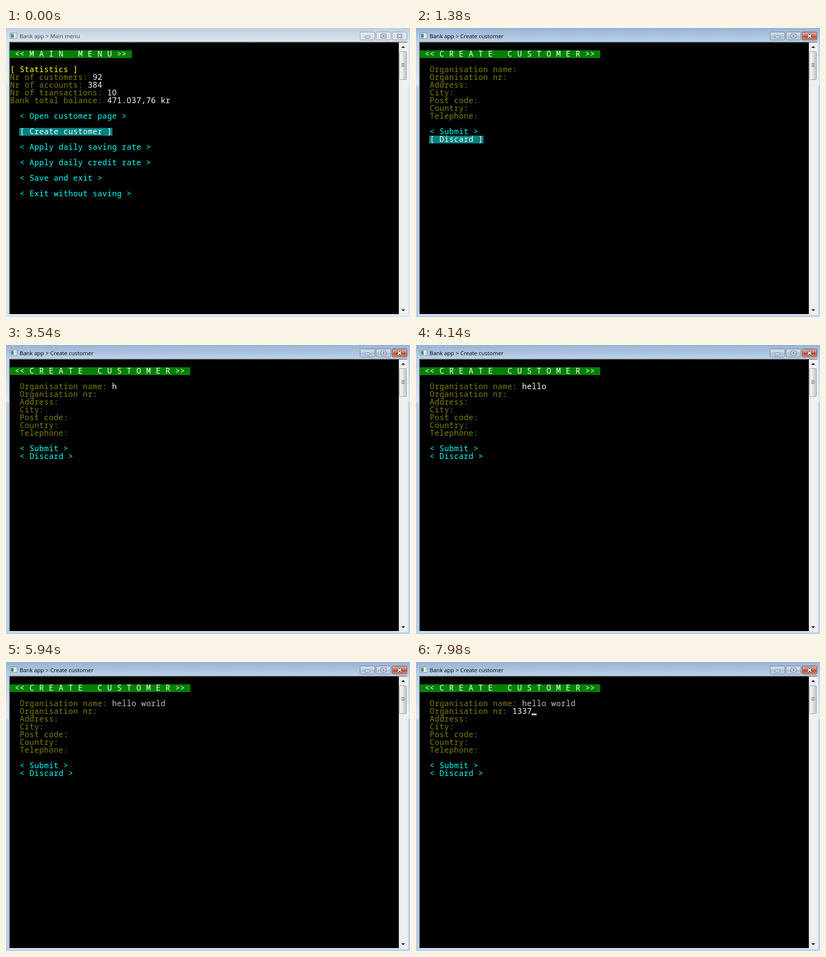
An HTML page that plays this animation: 831x596 px, repeating every 8 s.

```html
<!DOCTYPE html>
<html lang="en">
<head>
<meta charset="utf-8">
<title>Bank app</title>
<style>
  html, body { margin: 0; width: 100%; height: 100%; overflow: hidden; }
  svg { display: block; }
  .cells text { font: 16px "Noto Sans Mono", "DejaVu Sans Mono", monospace; white-space: pre; }
  .cells .plain { font-family: "Noto Sans", sans-serif; }
  #title { font: 11.5px "Open Sans", "Noto Sans", sans-serif; }
</style>
</head>
<body>
<svg id="stage" width="831" height="596" viewBox="0 0 831 596">
  <defs>
    <linearGradient id="barOff" x2="0" y2="1">
      <stop stop-color="#bfcddd"/><stop offset="1" stop-color="#d9e5f2"/>
    </linearGradient>
    <linearGradient id="barOn" x2="0" y2="1">
      <stop stop-color="#98b3d1"/><stop offset="1" stop-color="#bad1ea"/>
    </linearGradient>
    <linearGradient id="sideOn" x2="0" y2="1">
      <stop stop-color="#bad1ea"/><stop offset="1" stop-color="#dce8f5"/>
    </linearGradient>
    <linearGradient id="sideOff" x2="0" y2="1">
      <stop stop-color="#d9e5f2"/><stop offset="1" stop-color="#e6eef7"/>
    </linearGradient>
    <linearGradient id="btnOff" x2="0" y2="1">
      <stop stop-color="#e0e9f4"/><stop offset="1" stop-color="#d3e0ee"/>
    </linearGradient>
    <linearGradient id="btnOn" x2="0" y2="1">
      <stop stop-color="#cfdeee"/><stop offset=".48" stop-color="#bdd0e6"/>
      <stop offset=".5" stop-color="#a5bdd8"/><stop offset="1" stop-color="#bcd2ea"/>
    </linearGradient>
    <linearGradient id="btnRed" x2="0" y2="1">
      <stop stop-color="#e3a496"/><stop offset=".48" stop-color="#d27a66"/>
      <stop offset=".5" stop-color="#bd4630"/><stop offset="1" stop-color="#d98063"/>
    </linearGradient>
    <linearGradient id="track">
      <stop stop-color="#e5e5e5"/><stop offset=".25" stop-color="#f0f0f0"/>
    </linearGradient>
    <linearGradient id="thumb">
      <stop stop-color="#f6f6f6"/><stop offset=".48" stop-color="#eaeaeb"/>
      <stop offset=".52" stop-color="#d9dadc"/><stop offset="1" stop-color="#c9cacd"/>
    </linearGradient>
    <linearGradient id="icon" x2="0" y2="1">
      <stop stop-color="#4c8fa8"/><stop offset="1" stop-color="#3d9a66"/>
    </linearGradient>
  </defs>

  <rect id="frame" width="831" height="596"/>
  <rect id="side" y="28" width="831" height="90"/>
  <rect id="bar" width="831" height="28"/>

  <g id="appIcon">
    <rect x="8.5" y="10.5" width="14" height="11" fill="#fff" stroke="#7b858f"/>
    <rect x="10" y="12" width="6" height="8" fill="url(#icon)"/>
    <path d="M18 13h1v3h-1zM20 13h1v3h-1zM18 18h3v1h-3z" fill="#9aa5b0"/>
  </g>
  <text id="title" x="28" y="21"></text>

  <g id="buttons"></g>
  <g stroke="#535666" fill="#f6f6f6">
    <rect x="738.5" y="16.5" width="10" height="4" rx="1"/>
    <path d="M771.5 12.5h10v8h-10zM774.5 15.5h4v2h-4z" fill-rule="evenodd"/>
  </g>
  <g fill="none" stroke-linecap="square">
    <path d="M806.5 14l6 5M812.5 14l-6 5" stroke="#535666" stroke-width="4"/>
    <path d="M806.5 14l6 5M812.5 14l-6 5" stroke="#fafafa" stroke-width="2"/>
  </g>

  <path d="M6 592V28H827V592z" fill="#fff"/>
  <path d="M6 591V28H826V591z" fill="#e3e3e3"/>
  <path d="M6 591V28H826V29H7V591z" fill="#a0a0a0"/>
  <path d="M7 590V29H825V30H8V590z" fill="#696969"/>
  <rect x="8" y="30" width="800" height="560"/>

  <rect x="808" y="30" width="17" height="560" fill="url(#track)"/>
  <path d="M813 41l4-4 4 4zM813 580l4 4 4-4z" fill="#222"/>
  <rect x="809.5" y="48.5" width="14" height="58" rx="2" fill="url(#thumb)" stroke="#979797"/>
  <path d="M813 73.5h7M813 76.5h7M813 79.5h7" stroke="#4a4a4a"/>
  <path d="M813 74.5h7M813 77.5h7M813 80.5h7" stroke="#fff" opacity=".7"/>

  <g id="menu" class="cells"></g>
  <g id="form" class="cells"></g>
  <rect id="cursor" width="10" height="4" fill="#c0c0c0"/>
</svg>
<script>
const LOOP = 8000, FOCUS = 300, OPEN = 1380, EDIT = 2640, ENTER = 5040;
const OLIVE = '#808000', CYAN = '#00ffff', TEAL = '#008080', GREEN = '#008000', WHITE = '#ffffff';
const $ = id => document.getElementById(id);
const colX = c => 8 + c * 10;
const rowY = r => 30 + r * 16;

function add(parent, tag, attrs) {
  const el = document.createElementNS('http://www.w3.org/2000/svg', tag);
  for (const k in attrs) el.setAttribute(k, attrs[k]);
  return parent.appendChild(el);
}

// Text on the console grid, one character per cell; zeros have no slash.
function print(parent, col, row, str, fill) {
  const x = [...str].map((_, i) => colX(col + i) + .2).join(' ');
  const el = add(parent, 'text', { x, y: rowY(row) + 13, fill });
  for (const part of str.split(/(0)/)) {
    if (part) add(el, 'tspan', part === '0' ? { class: 'plain' } : {}).textContent = part;
  }
  return el;
}

function block(parent, col, row, str, back) {
  const x = Math.max(8, colX(col) - 1);
  add(parent, 'rect', { x, y: rowY(row), width: colX(col + str.length) + 1 - x, height: 16, fill: back });
  print(parent, col, row, str, WHITE);
}

const menu = $('menu'), form = $('form');

block(menu, 0, 1, ' << M A I N   M E N U >> ', GREEN);
print(menu, 0, 3, '[ Statistics ]', '#ffff00');
[['Nr of customers: ', '92'], ['Nr of accounts: ', '384'],
 ['Nr of transactions: ', '10'], ['Bank total balance: ', '471.037,76 kr']].forEach(([label, value], i) => {
  print(menu, 0, 4 + i, label, OLIVE);
  print(menu, label.length, 4 + i, value, WHITE);
});
['Open customer page', 'Create customer', 'Apply daily saving rate',
 'Apply daily credit rate', 'Save and exit', 'Exit without saving'].forEach((item, i) => {
  if (i === 1) block(menu, 2, 11, `[ ${item} ]`, TEAL);
  else print(menu, 2, 9 + i * 2, `< ${item} >`, CYAN);
});

block(form, 0, 1, ' << C R E A T E   C U S T O M E R >> ', GREEN);
['Organisation name:', 'Organisation nr:', 'Address:', 'City:', 'Post code:', 'Country:', 'Telephone:']
  .forEach((label, i) => print(form, 2, 3 + i, label, OLIVE));
print(form, 2, 11, '< Submit >', CYAN);
const discardOn = add(form, 'g', {}), discardOff = add(form, 'g', {});
block(discardOn, 2, 12, '[ Discard ]', TEAL);
print(discardOff, 2, 12, '< Discard >', CYAN);

// Each field holds its text and the time of every key press.
const fields = [
  { col: 21, row: 3, text: 'hello world',
    keys: [3540, 3600, 3780, 3900, 4140, 4200, 4320, 4440, 4560, 4740, 4800] },
  { col: 19, row: 4, text: '1337', keys: [6420, 7200, 7380, 7980] }
];
for (const f of fields) f.el = print(form, f.col, f.row, f.text, WHITE);

// Cursor visibility: from, to, column, row.
const blinks = [
  [2880, 3360, 21, 3], [4320, 4380, 28, 3], [4920, 5040, 32, 3], [5400, 5940, 19, 4],
  [6960, 7200, 20, 4], [7380, 7440, 22, 4], [7980, 8000, 23, 4]
];

const buttons = [728, 761, 794].map(x => {
  const el = add($('buttons'), 'rect', { x: x + .5, y: 8.5, width: 30, height: 16, rx: 2 });
  add($('buttons'), 'rect', { x: x + 1.5, y: 9.5, width: 28, height: 14, rx: 1,
    fill: 'none', stroke: '#fff', 'stroke-opacity': .45 });
  return el;
});

const show = (el, on) => el.setAttribute('visibility', on ? 'visible' : 'hidden');

function paintWindow(active) {
  const mode = active ? 'On' : 'Off';
  $('frame').setAttribute('fill', active ? '#b9d1ea' : '#d7e4f2');
  $('side').setAttribute('fill', `url(#side${mode})`);
  $('bar').setAttribute('fill', `url(#bar${mode})`);
  $('title').setAttribute('fill', active ? '#000' : '#3c4046');
  buttons.forEach((b, i) => {
    const red = active && i === 2;
    b.setAttribute('fill', `url(#btn${red ? 'Red' : mode})`);
    b.setAttribute('stroke', red ? '#5b2a2a' : active ? '#5f7288' : '#8593a5');
  });
}

function draw(t) {
  const opened = t >= OPEN;
  paintWindow(t >= FOCUS);
  $('title').textContent = 'Bank app > ' + (opened ? 'Create customer' : 'Main menu');
  menu.style.display = opened ? 'none' : '';
  form.style.display = opened ? '' : 'none';
  show(discardOn, t < EDIT);
  show(discardOff, t >= EDIT);
  for (const f of fields) {
    f.el.firstChild.textContent = f.text.slice(0, f.keys.filter(k => k <= t).length);
  }
  fields[0].el.setAttribute('fill', t < ENTER ? WHITE : '#c0c0c0');

  const blink = blinks.find(([from, to]) => t >= from && t < to);
  show($('cursor'), blink);
  if (blink) {
    $('cursor').setAttribute('x', colX(blink[2]));
    $('cursor').setAttribute('y', rowY(blink[3]) + 12);
  }
}

const start = performance.now();
function tick() {
  draw((performance.now() - start) % LOOP);
  requestAnimationFrame(tick);
}
tick();
</script>
</body>
</html>
```
